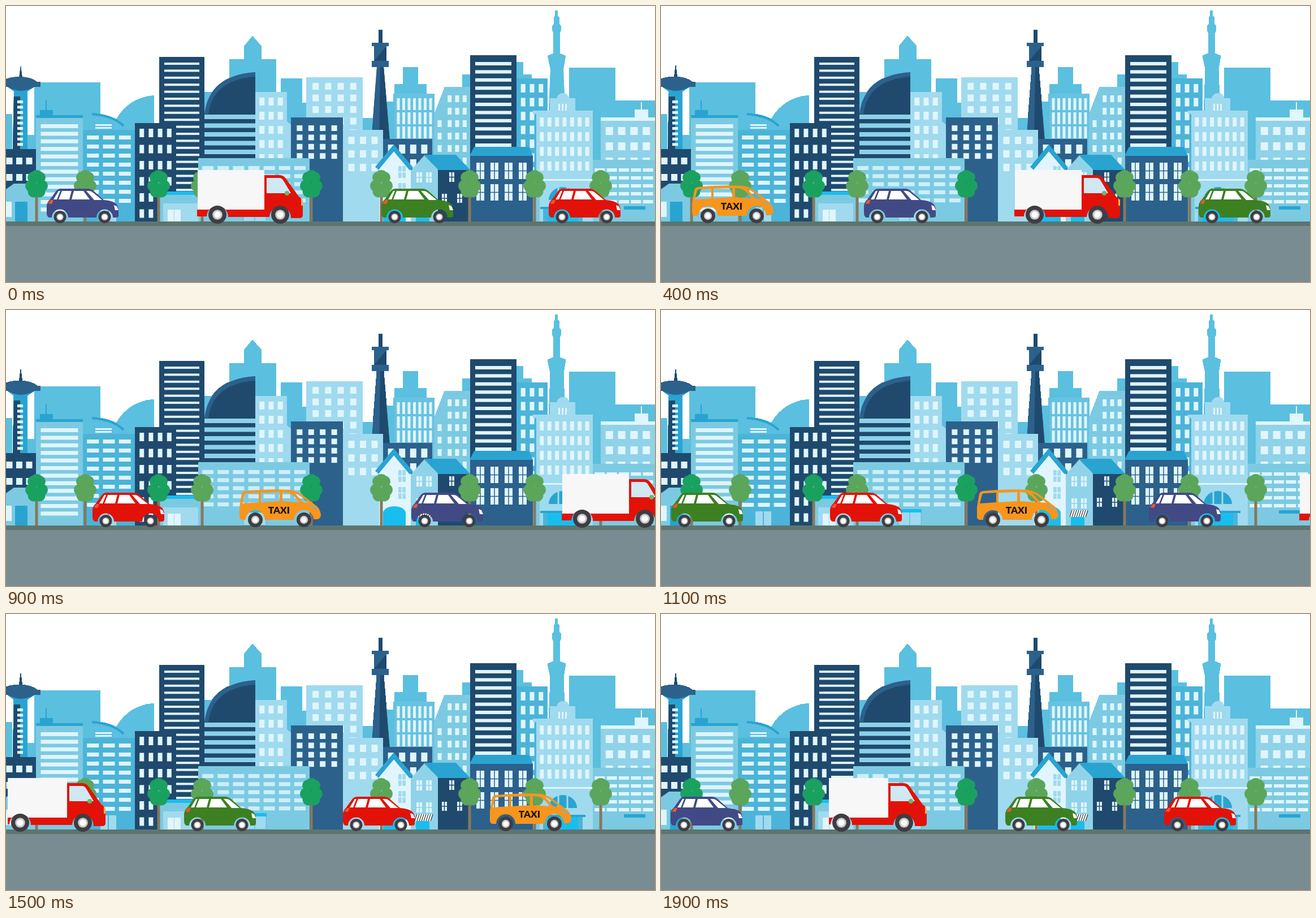
These frames come from a looping animation (1148 by 488 pixels, 2 s). An HTML page with a canvas:

```html
<!DOCTYPE html>
<html lang="en">
<head>
<meta charset="utf-8">
<title>City traffic</title>
<style>
html, body { margin: 0; width: 100%; height: 100%; overflow: hidden; background: #fff; }
canvas { display: block; }
</style>
</head>
<body>
<canvas id="stage" width="1148" height="488"></canvas>
<script>
const stage = document.getElementById('stage').getContext('2d');
const backdrop = document.createElement('canvas');
backdrop.width = 1148;
backdrop.height = 488;
let g = backdrop.getContext('2d');

const SKY = '#5bbfdf', MID = '#7ccae2', PALE = '#a0daee', GLASS = '#e0f5fd', BLUE = '#4bb4d8',
  TEAL = '#29a4d1', CYAN = '#18beee', NAVY = '#1f4a6e', SLATE = '#2c618c', GROUND = 381;

function box(color, x, y, w, h) {
  g.fillStyle = color;
  g.fillRect(x, y, w, h);
}
function shape(color, d) {
  g.fillStyle = color;
  g.fill(new Path2D(d), 'evenodd');
}
function line(color, width, d) {
  g.strokeStyle = color;
  g.lineWidth = width;
  g.stroke(new Path2D(d));
}
function disc(color, x, y, r) {
  g.fillStyle = color;
  g.beginPath();
  g.arc(x, y, r, 0, 7);
  g.fill();
}
function wall(color, x, top, w) {
  box(color, x, top, w, GROUND - top);
}
function pane(bar, x, y, w, h, glass = GLASS) {
  box(glass, x, y, w, h);
  box(bar, x + w / 2 - 0.75, y, 1.5, h);
  box(bar, x, y + h / 2 - 0.75, w, 1.5);
}

// A wall down to the ground; its windows sit in evenly spread columns, one row per pitch.
function block(color, x, top, w, win) {
  const { cols = 1, size: [ww, wh], pitch, sill = 10, end = GROUND - 5, bars, glass = GLASS } = win;
  const gap = (w - cols * ww) / (cols + 1);
  wall(color, x, top, w);
  for (let y = top + sill; y + wh <= end; y += pitch)
    for (let c = 0; c < cols; c++) {
      const wx = x + gap + c * (ww + gap);
      if (bars) pane(color, wx, y, ww, wh);
      else box(glass, wx, y, ww, wh);
    }
}

function entrance(x, top, w, awning, glass) {
  box(awning, x, top, w, 6);
  block(awning === TEAL ? MID : SKY, x, top + 6, w, { cols: 2, size: [w / 2 - 2, 22], pitch: 99, sill: 0, end: GROUND, glass });
}

function skyline() {
  wall(SKY, 0, 191, 11);
  wall(SKY, 37, 228, 16);
  wall(SKY, 50, 135, 117);
  shape(SKY, 'M195 200Q217 162 262 158V300H195Z');
  wall(SKY, 351, 152, 30);
  shape(SKY, 'M395 94H421V71L436 53L452 71V94H478V200H395Z');
  wall(SKY, 486, 128, 38);
  wall(SKY, 524, 171, 10);
  wall(SKY, 631, 198, 36);
  shape(SKY, 'M673 240V169H685V155H687V138H702V108H729V138H744V155H758V240Z');
  wall(SKY, 807, 121, 14);
  wall(SKY, 903, 99, 12);
  wall(SKY, 915, 121, 15);
  shape(SKY, 'M971 8H976V18L979 20V32L982 36V42L980 47V84L990 88L986 112L989 190H960L963 112L958 88L968 84V47L966 42V36L969 32V20L971 18Z');
  wall(SKY, 996, 109, 82);
  wall(SKY, 1078, 167, 70);
}

function observationTower() {
  shape(NAVY, 'M26 105L29 128H23Z');
  shape(TEAL, 'M3 143H50L38 151V253H12L14 151Z');
  shape(NAVY, 'M14 160H25V253H12Z');
  for (let y = 167; y < 248; y += 9.4) box(GLASS, 20, y, 10, 5);
  shape(SLATE, 'M0 129Q10 125 26 125Q46 126 55 134H61V143H50Q26 157 3 143H0Z');
}

function radioTower() {
  box(NAVY, 659, 42, 7, 25);
  box(SLATE, 647, 65, 30, 6);
  box(SLATE, 651, 71, 22, 26);
  shape(NAVY, 'M673 71V97H651Z');
  box(SLATE, 647, 97, 30, 11);
  shape(SLATE, 'M656 108H668L679 240H646Z');
  shape(NAVY, 'M662 108H668L679 240H660Z');
}

function leftBlocks() {
  observationTower();
  block(NAVY, -6, 253, 59, { cols: 3, size: [11, 12], pitch: 29, sill: 15 });
  shape(MID, 'M0 324L14 314H53V381H0Z');
  box(GLASS, 0, 346, 10, 27);
  wall(TEAL, 16, 346, 22);

  box(TEAL, 70, 167, 2, 18);
  box(TEAL, 60, 184, 23, 10);
  block(MID, 53, 196, 83, { size: [66, 7], pitch: 13.4, sill: 13 });
  box(TEAL, 53, 193, 83, 5);

  block(BLUE, 136, 219, 92, { cols: 3, size: [21, 7], pitch: 16, end: 352 });
  shape(SKY, 'M152 190Q190 193 209 209V219H152Z');
  line(TEAL, 4, 'M152 191Q190 194 208 212');
  for (const y of [209, 214]) box(GLASS, 158, y, 29, 3);
  for (const x of [167, 182]) wall(PALE, x, 356, 13);

  block(NAVY, 271, 90, 80, { size: [62, 4], pitch: 12.4 });
  block(NAVY, 228, 207, 73, { cols: 4, size: [8, 15], pitch: 28.5 });

  block(NAVY, 351, 190, 90, { size: [90, 8], pitch: 15.5, sill: 2, glass: '#8cd1e8' });
  shape(SLATE, 'M351 190Q360 122 441 117V191H351Z');
  shape(NAVY, 'M358 191Q366 130 441 125V191Z');
}

function centreBlocks() {
  shape(PALE, 'M496 203L504 210V280H496Z');
  block(PALE, 441, 152, 56, { cols: 3, size: [9, 14], pitch: 25 });
  block(PALE, 531, 126, 100, { cols: 4, size: [11, 12], pitch: 20.5 });
  block(SLATE, 504, 197, 92, { cols: 4, size: [10, 10], pitch: 16.4, sill: 14, end: 275 });
  block(MID, 340, 269, 197, { cols: 7, size: [20, 7], pitch: 14.3, sill: 14, end: 348, glass: '#cdeef8' });
  entrance(419, 352, 42, CYAN, PALE);

  wall(MID, 272, 330, 68);
  wall(PALE, 278, 349, 62);
  box(CYAN, 272, 328, 68, 6);
  for (const x of [286, 298]) wall(GLASS, x, 360, 11);

  block('#68c2df', 687, 155, 71, { cols: 7, size: [5, 21], pitch: 25, sill: 8 });
  radioTower();
  shape(MID, 'M757 192L776 143H780V200H757Z');
  block(MID, 757, 192, 20, { size: [7, 12], pitch: 22 });
  block(MID, 775, 143, 46, { cols: 3, size: [7, 12], pitch: 22, sill: 15 });
  block(PALE, 596, 219, 71, { cols: 3, size: [11, 13], pitch: 24, sill: 12, end: 295 });
  block(SLATE, 667, 235, 87, { cols: 4, size: [11, 16], pitch: 26 });
}

function rightBlocks() {
  block(BLUE, 903, 128, 55, { cols: 3, size: [8, 15], pitch: 24.5 });
  block(NAVY, 821, 87, 82, { size: [64, 6], pitch: 14.4, sill: 12 });

  block('#90d2e8', 1052, 197, 96, { cols: 4, size: [13, 14], pitch: 27, sill: 17 });
  box(GLASS, 1052, 197, 96, 6);
  box(GLASS, 1112, 183, 24, 14);
  box(GLASS, 1123, 170, 2, 14);
  block(MID, 1038, 272, 110, { cols: 5, size: [18, 6], pitch: 14, sill: 15, end: 350 });
  entrance(1093, 354, 38, TEAL, GLASS);

  wall(PALE, 962, 163, 45);
  shape(PALE, 'M974 165A11 11 0 0 1 996 165Z');
  for (const x of [977, 983, 989]) box(GLASS, x, 173, 3, 13);
  block(PALE, 938, 187, 100, { cols: 7, size: [7, 16], pitch: 26, end: 300 });
  box(PALE, 932, 185, 106, 6);
  box(GLASS, 938, 306, 100, 3);
  wall(MID, 932, 309, 12);
  shape(TEAL, 'M960 343A25 23 0 0 1 1010 343Z');
  line(PALE, 3, 'M977 343V320M993 343V320');
  wall(BLUE, 950, 359, 70);
  box(TEAL, 945, 355, 80, 4);
  wall(CYAN, 958, 359, 54);
}

function houses() {
  block(SLATE, 821, 264, 111, { cols: 4, size: [14, 29], pitch: 38, sill: 13, end: 350, bars: true });
  shape(TEAL, 'M828 249H925L932 265H820Z');

  shape(GLASS, 'M660 284L686 252L716 288V381H660Z');
  line(TEAL, 8, 'M656 287L686 251L717 288');
  for (const y of [283, 313]) pane(GLASS, 694, y, 13, 21, PALE);
  shape(CYAN, 'M667 381V357Q672 347 687 347Q702 347 707 357V381Z');

  const side = '#90d3e9';
  shape(side, 'M716 291L740 264L766 291V381H716Z');
  wall(NAVY, 764, 288, 56);
  shape(TEAL, 'M739 263H796L821 290H765Z');
  for (const y of [294, 333])
    for (const x of [726, 743]) pane(side, x, y, 10, 18);
  pane(NAVY, 784, 294, 9, 17);
  for (const x of [771, 798]) pane(NAVY, x, 332, 9, 16);
  wall(CYAN, 725, 366, 24);
  shape('#fff', 'M726 354H755L751 366H722Z');
  for (let x = 723; x < 752; x += 4) line('#333', 1.2, `M${x} 366l4 -12`);
}

function tree(x, color) {
  box('#88775c', x - 2.5, 330, 5, GROUND - 330);
  disc(color, x, 301, 11);
  for (const side of [-1, 1]) {
    disc(color, x + side * 6, 303, 10);
    disc(color, x + side * 9.5, 318, 10.5);
    disc(color, x + side * 5, 328, 10.5);
  }
}

function wheel(x, y, r) {
  disc('#3e3d44', x, y, r);
  disc('#c9c9cb', x, y, r * 0.55);
  disc('#fff', x, y, r * 0.36);
}

function car(color) {
  shape(color, 'M0 353Q1 346 6 342L16 328Q19 323 26 323H72Q79 323 84 328L101 343Q115 344 122 349Q127 353 127 362V371Q127 374 122 374H117A14.5 14.5 0 0 0 88 374H38A14.5 14.5 0 0 0 9 374H4Q0 372 0 366Z');
  shape('#fff', 'M12 342L21 327H24L18 342ZM21 342L27 327H44L40 342ZM44 342L48 327H65L76 342ZM70 327H75Q79 327 82 330L98 343H84Z');
  shape('#f0542a', 'M2 349L7 343H12L9 350Z');
  shape('#fff', 'M119 352L124 354L127 361H121Z');
  for (const x of [23.5, 102.5]) wheel(x, 373, 11);
}

function taxi() {
  shape('#f7951d', 'M1 348L5 325Q7 320 13 320Q56 316 91 318Q104 320 116 330L134 344Q143 349 145 361Q145 369 139 370H132A17 17 0 0 0 98 371H46A17 17 0 0 0 12 371H5Q0 370 1 362Z'
    + 'M6 342L10 326Q11 324 15 324L35 323V340ZM39 340V323L72 322V338ZM77 338V322L87 323Q97 326 107 340ZM98 323Q108 327 124 341L113 340Z');
  line('#5bbfdf', 1.5, 'M126 346L140 352');
  g.fillStyle = '#1d1713';
  g.font = '900 17px Lato, sans-serif';
  g.textAlign = 'center';
  g.fillText('TAXI', 71, 360);
  for (const x of [29, 115]) wheel(x, 371, 13);
}

// After the lap restarts, the rear edge of the truck is cut off.
function truck(lapped) {
  g.beginPath();
  g.rect(lapped ? 14 : 0, 280, 200, 110);
  g.clip();
  box('#f7f7f7', 1, 290, 118, 70);
  shape('#e21208', 'M0 360H119V299H146Q153 299 157 305L180 337Q187 341 187 349V370Q187 375 181 375H166A19 19 0 0 0 128 373H55A19 19 0 0 0 17 372H0Z');
  shape('#d0e8f1', 'M123 331V304H145Q150 304 153 309L166 331Z');
  disc('#6db56f', 159, 331, 4);
  shape('#f6b04c', 'M184 340L187 343V353H184Z');
  for (const x of [36, 147]) wheel(x, 369, 16);
}

skyline();
leftBlocks();
centreBlocks();
rightBlocks();
houses();
for (const x of [54, 270, 540]) tree(x, '#1aa160');
for (const x of [140, 347, 664, 820, 935, 1052]) tree(x, '#5ba65b');
box('#5d7571', 0, GROUND, 1148, 8);
box('#788c91', 0, GROUND + 8, 1148, 99);

// Distance travelled at a few 100 ms ticks; linear in between.
const travel = [[0, 0], [4, 287], [6, 432], [9, 645], [13, 937], [17, 1238], [19, 1382]];

function distance(tick) {
  const i = Math.max(1, travel.findIndex(p => p[0] >= tick));
  const [t0, d0] = travel[i - 1], [t1, d1] = travel[i];
  return Math.round(d0 + (d1 - d0) * (tick - t0) / (t1 - t0));
}

function frame() {
  const moved = distance(Math.floor(performance.now() % 2000 / 100));
  const drive = (start, draw, lap = 1437) => {
    const x = start + moved, lapped = x > lap - 250;
    g.save();
    g.translate(lapped ? x - lap : x, 0);
    draw(lapped);
    g.restore();
  };
  g.drawImage(backdrop, 0, 0);
  drive(-233, taxi);
  drive(72, () => car('#424a86'));
  drive(338, truck);
  drive(664, () => car('#3d8022'));
  drive(960, () => car('#e21208'), 1452);
  requestAnimationFrame(frame);
}

g = stage;
box('#fff', 0, 0, 1148, 488);
frame();
</script>
</body>
</html>
```
